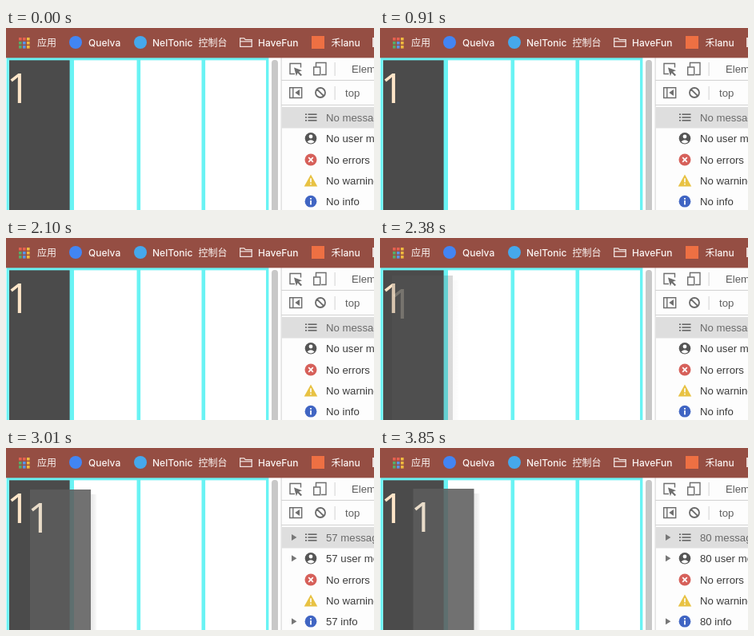
Write an HTML page with a canvas that moves like this. It is 460 px wide and 228 px high and loops after 3920 ms.

```html
<!DOCTYPE html>
<html lang="zh">
<head>
<meta charset="utf-8">
<title>Drag preview</title>
<style>
html, body { margin: 0; width: 100%; height: 100%; overflow: hidden; background: #fff; }
canvas { display: block; width: 460px; height: 228px; }
</style>
</head>
<body>
<canvas id="stage" width="460" height="228"></canvas>
<script>
const ctx = document.getElementById('stage').getContext('2d');
const LOOP = 3920, STEP = 70;
const BAR_FONT = '500 12px Inter, "Noto Sans CJK SC", "Noto Sans CJK", sans-serif';
const PANEL_FONT = '13.2px "Liberation Sans", Arial, sans-serif';
const DIGIT_FONT = '52px "Open Sans", "Noto Sans", sans-serif';
const ICON = '#6e6e6e', PANEL = '#fdfdfd', RULE = '#d2d2d2', CYAN = '#69f3f4';

// time, x offset, y offset, opacity
const ghostPath = [[2240, 4, 2, 0], [2310, 8, 5, .08], [2380, 11, 7, .23], [2450, 18, 10, .6],
  [2520, 22, 11, .87], [3010, 26, 12, .87], [3850, 37.5, 11, .87]];
const countPath = [[2400, 6], [2520, 26], [3010, 57], [3850, 80]];

function sample(path, t) {
  if (t <= path[0][0]) return path[0].slice(1);
  for (let i = 1; i < path.length; i++) {
    const a = path[i - 1], b = path[i];
    if (t <= b[0]) {
      const k = (t - a[0]) / (b[0] - a[0]);
      return a.slice(1).map((v, j) => v + (b[j + 1] - v) * k);
    }
  }
  return path[path.length - 1].slice(1);
}

function rect(x, y, w, h, color) {
  ctx.fillStyle = color;
  ctx.fillRect(x, y, w, h);
}

function disc(x, y, r, color) {
  ctx.fillStyle = color;
  ctx.beginPath();
  ctx.arc(x, y, r, 0, Math.PI * 2);
  ctx.fill();
}

function text(str, x, y, font, color) {
  ctx.font = font;
  ctx.fillStyle = color;
  ctx.fillText(str, x, y);
}

function line(d, color, width = 1.4) {
  ctx.strokeStyle = color;
  ctx.lineWidth = width;
  ctx.stroke(new Path2D(d));
}

function shape(d, color) {
  ctx.fillStyle = color;
  ctx.fill(new Path2D(d));
}

function bookmarks() {
  rect(0, 0, 460, 37.4, '#954e43');
  const dots = ['#e8604f', '#e8604f', '#f0b93f', '#57ad68', '#5795e8', '#f0b93f', '#57ad68', '#5795e8', '#f0b93f'];
  dots.forEach((c, i) => rect(16 + i % 3 * 5, 12 + Math.floor(i / 3) * 5, 3.6, 3.6, c));
  disc(87, 18, 8, '#4285f4');
  disc(168, 18, 8, '#45a8ec');
  line('M292.7 23.4 v-10.5 h5 l1.5 1.8 h8 v8.7 z M292.7 16.8 h14.5', '#f0e2df', 1.3);
  rect(382, 10, 16, 16, '#ee7043');
  rect(458, 12, 2, 12, '#eadbd8');
  const labels = [['应用', 39], ['Quelva', 103], ['NelTonic', 183], ['控制台', 240.5], ['HaveFun', 315], ['禾lanu', 406.5]];
  for (const [label, x] of labels) text(label, x, 22.5, BAR_FONT, '#fbf5f3');
}

function grid() {
  rect(0, 37, 344, 191, '#fff');
  rect(4, 40, 77, 188, '#4b4b4b');
  rect(1, 37, 327, 3.4, CYAN);
  for (const [x, w] of [[.6, 3.2], [79.6, 5.4], [163.5, 4.6], [244.5, 4.6], [325, 3.4]]) rect(x, 37, w, 191, CYAN);
  text('1', .7, 94, DIGIT_FONT, '#fde5c8');
  ctx.fillStyle = '#c8c8c8';
  ctx.beginPath();
  ctx.roundRect(332, 40, 8, 200, 4);
  ctx.fill();
}

function ghost(t) {
  const [dx, dy, alpha] = sample(ghostPath, t);
  if (!alpha) return;
  const x = 4 + dx, y = 40 + dy;
  ctx.save();
  ctx.globalAlpha = alpha;
  rect(x, y, 76, 188, '#5c5c5c');
  text('1', x - 3.3, y + 53.5, DIGIT_FONT, '#fff0da');
  const shade = ctx.createLinearGradient(x + 76, 0, x + 84, 0);
  shade.addColorStop(0, 'rgba(0,0,0,.1)');
  shade.addColorStop(.6, 'rgba(0,0,0,.06)');
  shade.addColorStop(1, 'rgba(0,0,0,0)');
  rect(x + 76, y + 6, 8, 188, shade);
  ctx.restore();
}

function toolbars(t) {
  rect(344, 37, 116, 191, PANEL);
  rect(343.6, 37, 1, 191, RULE);
  for (const y of [65, 96]) rect(344, y, 116, 1, RULE);
  for (const y of [43, 73]) rect(410.6, y, 1, 17, RULE);

  line('M361 57.5 h-6 v-13 h13.5 v5', ICON);
  shape('M360 49.5 l10 3.8 -4 1.5 4 4 -1.5 1.5 -4 -4 -1.6 4 z', ICON);
  line('M387.5 49 v-5.5 h12.5 v15 h-6 M384.7 49 h8 v9.8 h-8 z', ICON);
  text('Elements', 432, 56, PANEL_FONT, '#5c5c5c');

  line('M354.7 74.7 h15 v12.8 h-15 z M358.8 74.7 v12.8', ICON);
  shape('M361.3 81 l5.7 -4 v8 z', ICON);
  if (t >= 1400 && t < 1750) rect(380, 69.5, 26, 23.5, '#e9e9e9');
  line('M387 81 a6 6 0 1 0 12 0 a6 6 0 1 0 -12 0 M388.8 76.8 l8.4 8.4', '#6a6a6a', 1.8);
  text('top', 424, 86, PANEL_FONT, '#606060');
}

function sidebar(t) {
  const count = t > 2400 ? Math.round(sample(countPath, t)[0]) : 0;
  rect(345, 99, 115, 26.5, '#dedede');
  ['messages', 'user messages', 'errors', 'warnings', 'info'].forEach((kind, i) => {
    const y = 112 + i * 26.3;
    const active = count && i !== 2 && i !== 3;
    if (active) shape(`M357 ${y - 4} l6.4 4 -6.4 4 z`, '#777');
    text(`${active ? count : 'No'} ${kind}`, 400, y + 5, PANEL_FONT, i ? '#3c3c3c' : '#6a6a6a');
  });

  for (const y of [108.2, 112, 115.8]) {
    rect(374, y - .8, 2, 1.6, '#666');
    rect(377.5, y - .8, 11, 1.6, '#666');
  }
  disc(381, 138.3, 7.3, '#555');
  disc(381, 136, 2.4, PANEL);
  shape('M376.5 142.4 q4.5 -4.2 9 0 q-4.5 4.3 -9 0 z', PANEL);
  disc(381, 165, 7.5, '#d6605a');
  line('M378.2 162.2 l5.6 5.6 M383.8 162.2 l-5.6 5.6', '#fff', 1.7);
  shape('M381 183.4 l8.3 15 h-16.6 z', '#e8c243');
  rect(380.2, 188.3, 1.6, 5, '#fff');
  rect(380.2, 194.7, 1.6, 1.7, '#fff');
  disc(381, 217.2, 7.4, '#4065c3');
  rect(380.1, 213, 1.8, 1.8, '#fff');
  rect(380.1, 216, 1.8, 5.4, '#fff');
}

function draw(now) {
  const t = Math.floor(now % LOOP / STEP) * STEP;
  grid();
  ghost(t);
  toolbars(t);
  sidebar(t);
  bookmarks();
}

function tick() {
  draw(performance.now());
  requestAnimationFrame(tick);
}
tick();
</script>
</body>
</html>
```
